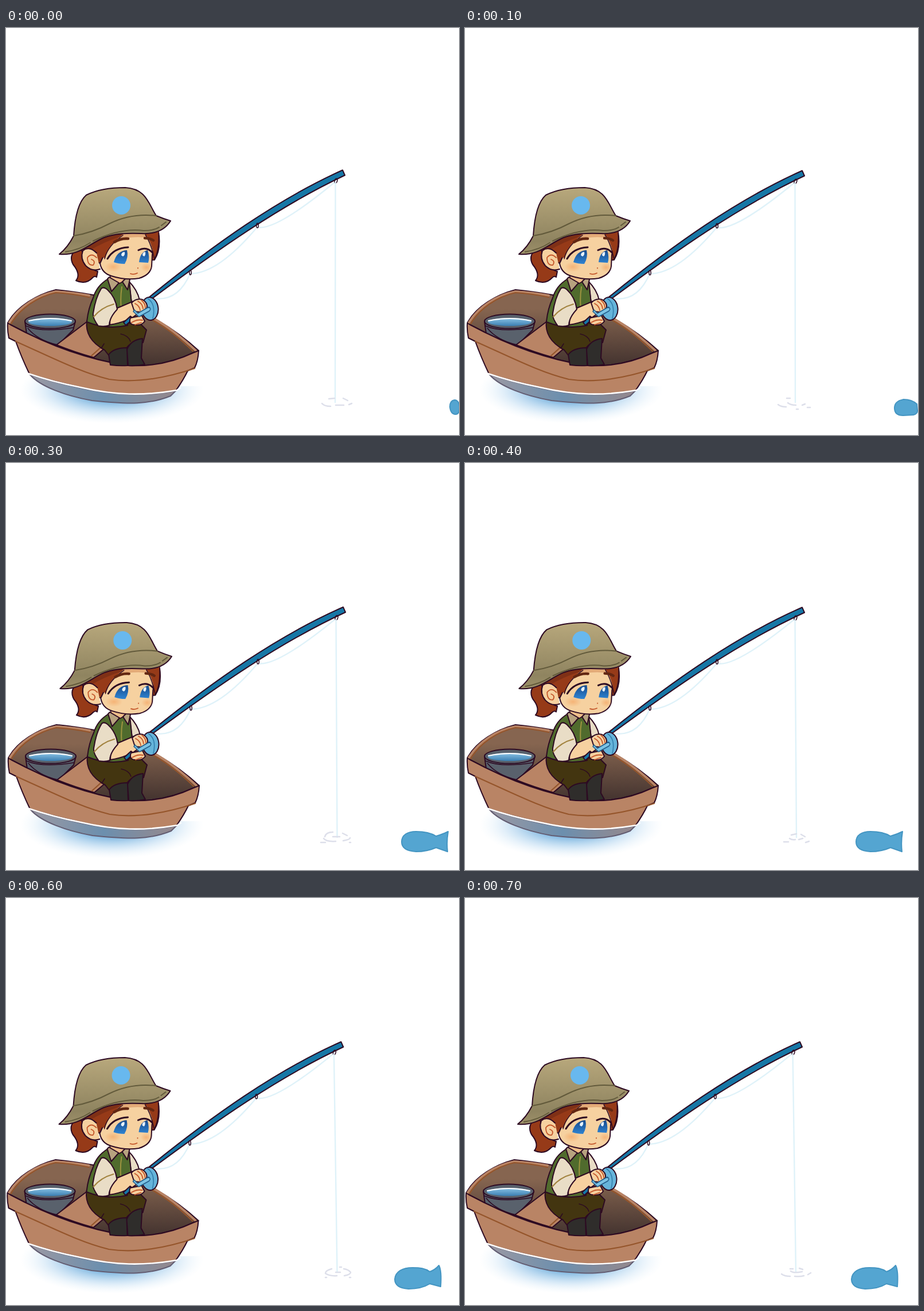
Write an HTML page that moves like this. It is 790 px wide and 709 px high and loops after 800 ms.

```html
<!DOCTYPE html>
<html lang="en">
<head>
<meta charset="utf-8">
<title>Fishing</title>
<style>
html, body { margin: 0; width: 100%; height: 100%; overflow: hidden; background: #fff; }
svg { display: block; width: 100%; height: 100%; }
path, ellipse, line { stroke-linecap: round; stroke-linejoin: round; }
.ink { stroke: #2d0a22; stroke-width: 2; }
.thin { fill: none; stroke: #2d0a22; stroke-width: 1.5; }
.rim { fill: none; stroke: #95552b; stroke-width: 2.2; }
.edge { fill: none; stroke: #b98465; stroke-width: 4; }
.skin { fill: #f6d1a0; }
.hair { fill: #963a18; }
.crease { fill: none; stroke: #c4562a; stroke-width: 1.8; }
.string { fill: none; stroke: #dff2f9; stroke-width: 2.4; }
.stitch { fill: none; stroke: #625a3b; stroke-width: 2; }
</style>
</head>
<body>
<svg viewBox="0 0 790 709">
<defs>
  <radialGradient id="water">
    <stop offset="0" stop-color="#3b8fce" stop-opacity=".95"/><stop offset=".4" stop-color="#5aa2d8" stop-opacity=".7"/>
    <stop offset=".7" stop-color="#8cc0e8" stop-opacity=".33"/><stop offset="1" stop-color="#cfe7f7" stop-opacity="0"/>
  </radialGradient>
  <linearGradient id="inside" x2="0" y2="1">
    <stop offset=".25" stop-color="#866550"/><stop offset="1" stop-color="#43332f"/>
  </linearGradient>
  <linearGradient id="keel">
    <stop offset="0" stop-color="#9b98a2"/><stop offset=".5" stop-color="#6c8fae"/><stop offset="1" stop-color="#96888c"/>
  </linearGradient>
  <linearGradient id="felt" x2="0" y2="1">
    <stop offset="0" stop-color="#b8a87c"/><stop offset=".8" stop-color="#8f8460"/><stop offset="1" stop-color="#9d9069"/>
  </linearGradient>
  <linearGradient id="iris" x2="0" y2="1">
    <stop offset="0" stop-color="#174a8c"/><stop offset="1" stop-color="#2f84d2"/>
  </linearGradient>
  <linearGradient id="pool" x2="0" y2="1">
    <stop offset="0" stop-color="#8cc4e6"/><stop offset="1" stop-color="#3b7fb2"/>
  </linearGradient>
  <radialGradient id="blush">
    <stop offset="0" stop-color="#f4a765" stop-opacity=".7"/><stop offset="1" stop-color="#f4a765" stop-opacity="0"/>
  </radialGradient>
  <clipPath id="surface"><path d="M20 598Q120 630 200 634Q280 622 350 624V709H20Z"/></clipPath>
</defs>

<ellipse cx="185" cy="630" rx="160" ry="59" fill="url(#water)" clip-path="url(#surface)"/>

<g id="boat">
  <path class="ink" fill="url(#inside)" d="M3 514C18 485 55 464 87 456C110 458 135 462 152 465C210 474 285 515 336 562L326 566C290 583 250 590 213 588C130 576 60 545 8 517Z"/>
  <path class="edge" d="M6 513C22 486 55 465 87 459Q118 461 145 466M246 500Q285 519 331 562"/>
  <path class="rim" d="M9 515C25 488 55 468 87 461Q118 463 145 469M246 504Q285 523 326 563"/>
  <path class="ink" fill="#59616c" d="M33 511L36 533Q62 546 90 553L117 526L121 511Z"/>
  <ellipse class="ink" cx="77" cy="511" rx="44" ry="12.5" fill="#59616c"/>
  <ellipse cx="77" cy="512" rx="38" ry="7" fill="url(#pool)"/>
  <path d="M40 510Q77 502 114 510" fill="none" stroke="#fff" stroke-width="2"/>
  <path class="thin" d="M35 519Q62 531 117 522M38 523Q55 544 90 552"/>
  <path class="ink" fill="#b98465" d="M88 552L142 511L172 558L153 574Q120 565 88 552Z"/>
  <path class="rim" d="M149 571L168 554"/>
  <path class="ink" fill="#b98465" d="M3 514L8 517C60 545 130 576 213 588C250 590 290 583 326 566L336 562Q335 580 329 592L317 597Q310 612 296 632C240 642 190 640 130 626Q80 615 41 603C30 580 22 560 17 546L5 540Q2 526 3 514Z"/>
  <path class="rim" d="M17 546C80 574 130 600 180 612C235 620 290 606 329 593"/>
  <path fill="url(#keel)" stroke="#635d72" stroke-width="2" d="M42 604Q80 616 130 627C190 640 240 642 296 632L287 641C250 656 215 656 150 649C105 641 60 625 42 604Z"/>
  <path d="M39 602Q80 616 130 626C190 640 240 641 298 631L304 627" fill="none" stroke="#fff" stroke-width="2.600"/>

  <!-- legs -->
  <path class="ink" fill="#433510" d="M141 510C138 532 150 549 172 561L179 570Q192 557 210 558Q217 545 239 548L245 526L234 515Z"/>
  <path class="ink" fill="#2f2d2b" d="M179 569L182 587Q198 589 212 588L211 557Q188 557 179 569ZM213 588L211 560Q218 543 238 541L236 575L242 586Q228 589 213 588Z"/>
  <path class="thin" d="M217 546Q214 536 200 533M166 558L171 550"/>

  <!-- torso -->
  <path class="ink" fill="#e9ddc6" d="M214 441Q229 456 233 474L220 486Z"/>
  <path class="ink" fill="#506b2d" d="M178 437Q158 449 152 470Q143 490 141 512Q176 526 212 518L219 480L215 441Z"/>
  <path fill="none" stroke="#9f9440" stroke-width="2" d="M202 451Q199 470 201 489M196 507Q205 509 213 504"/>
  <path class="thin" style="fill:#eebd88" d="M181 430L184 442L198 445L210 438V431Z"/>
  <path class="ink" fill="#b7a27f" d="M177 437L184 459L197 444L180 434ZM203 442L212 456L216 438L211 434Z"/>
  <path class="ink skin" d="M182 493L222 476L240 490L221 504Q202 514 181 517Z"/>
  <path class="ink" fill="#e9ddc6" d="M166 454Q156 470 152 497Q151 506 161 519Q172 521 180 518Q180 505 194 490Q191 469 177 456Q170 450 166 454Z"/>
  <path d="M153 503Q166 487 188 481" fill="none" stroke="#a2833f" stroke-width="2"/>
</g>

<g id="rod">
  <path class="string" d="M258 471Q300 477 321 428Q370 428 438 347Q470 354 574 268"/>
  <path class="ink" fill="#1677a6" d="M249.500 469C361 378.500 473 298.500 587 247.500L591 256.500C478 309.500 367 387.500 252.500 473Z"/>
  <g class="thin">
    <ellipse cx="321.500" cy="426" rx="1.700" ry="4"/>
    <ellipse cx="438.500" cy="344" rx="1.800" ry="4"/>
    <ellipse cx="575.500" cy="266" rx="2.200" ry="4" transform="rotate(18 575 266)"/>
  </g>
</g>

<g id="grip">
  <path class="ink" fill="#1677a6" d="M205 513L217 502L222 506L209 518Z"/>
  <path class="ink skin" d="M217 505Q213 517 225 517Q236 519 242 511L237 501Z"/>
  <path class="crease" d="M219 513Q229 507 238 509M225 517L236 513"/>
  <ellipse class="ink" cx="251" cy="489" rx="14.500" ry="20" fill="#66b4da" transform="rotate(-6 251 489)"/>
  <path d="M247 471Q262 481 256 506" fill="none" stroke="#337fae" stroke-width="1.600"/>
  <path class="ink skin" d="M219 479Q227 470 238 473Q247 478 246 487L237 495L224 494Z"/>
  <path class="crease" d="M230 476Q238 480 239 489M236 474Q243 480 243 487M225 480Q233 484 234 492"/>
  <path fill="#7cc4e5" stroke="#245e8b" stroke-width="1.600" d="M224 491L230 497L249 486Q254 489 250 493L232 503L222 494Z"/>
</g>

<g id="head">
  <path class="ink hair" d="M122 386Q109 397 117 412Q131 429 122 440Q139 448 151 435Q155 431 158 434L160 424Q145 420 139 405L160 380Z"/>
  <path class="ink hair" d="M128 378Q137 408 168 410L259 404Q271 385 266 355Q200 330 145 362Z"/>
  <path class="ink skin" d="M164 410Q167 427 184 432Q209 440 232 436Q252 430 254 415L255 395L263 362Q220 350 190 362L171 395Z"/>
  <path fill="#e3aa77" d="M190 362Q220 350 262 358L260 368Q220 358 186 374Z"/>
  <path class="hair" d="M140 380Q151 395 173 401Q178 378 206 358L180 352Z"/>
  <path fill="#712b15" d="M140 379L145 388Q170 373 200 363L206 355L180 352Z" opacity=".6"/>
  <path class="hair" d="M240 357Q253 366 259 403Q270 382 266 354Z"/>
  <path class="thin" d="M172 402Q177 380 204 361M243 360Q253 375 259 403Q268 385 266 357"/>
  <path class="ink skin" d="M158 392Q145 379 134 388Q129 402 139 414Q150 425 164 420"/>
  <path class="crease" d="M158 400Q149 391 142 400Q142 414 152 413Q157 406 149 403"/>
  <ellipse cx="187" cy="416" rx="15" ry="9" fill="url(#blush)"/>
  <ellipse cx="245" cy="417" rx="10" ry="8" fill="url(#blush)"/>
  <path d="M189 373Q200 366 213 367M242 366Q251 366 257 370" fill="none" stroke="#632712" stroke-width="4.500"/>
  <path fill="url(#iris)" d="M188 408Q193 388 211 387Q214 399 207 411Q196 411 188 408ZM232 408Q234 390 247 387Q251 399 248 409Z"/>
  <path d="M177 402Q188 383 213 382M231 387Q245 380 255 391" fill="none" stroke="#2d0a22" stroke-width="3"/>
  <path fill="#e6f2fb" d="M201 396Q201 390 207 390Q208 396 204 398ZM238 396Q238 390 243 390Q244 395 241 398Z"/>
  <path class="crease" d="M217 428Q223 430 229 427M230 418v.5"/>

  <path class="ink" fill="url(#felt)" d="M118 362C120 330 126 303 140 291C160 281 185 278 208 278C244 280 248 305 262 327Q274 332 287 336C276 354 256 359 236 358C210 357 190 358 171 365C143 377 128 397 93 394Q108 382 118 362Z"/>
  <path class="stitch" d="M118 362Q150 357 180 341Q218 322 262 327M104 390Q129 386 147 374M152 371Q200 348 240 353Q258 353 267 347M271 344L279 338"/>
  <circle cx="201" cy="309" r="16" fill="#68b8ee"/>
</g>

<line id="line" class="string"/>
<path id="ripple" fill="none" stroke="#dddfea" stroke-width="2.500"/>
<path id="fish" fill="#54a5d1" stroke="#4495c2" stroke-width="2"/>
</svg>

<script>
const $ = id => document.getElementById(id);
const set = (id, attrs) => Object.entries(attrs).forEach(([k, v]) => $(id).setAttribute(k, v));

// Per 100 ms step: sway, head tilt, rod stretch and dip at the tip, foot of the line
const poses = [
  [0, 0, 0, 0, 574], [1, 0, 0, 1, 576], [1, .6, 0, 3, 577], [1, .6, 0, 3.5, 577.5],
  [1, .6, 0, 4, 578], [0, 0, -2.5, 3, 578], [-.5, 0, -2.2, 3, 577.5], [-1, 0, -2, 3, 577]
];

const swim = "M682 660C682 648 692 642 707 642C724 642 734 645 742 650Q753 647 763 642Q760 660 762 677L742 670C733 674 724 677 707 677C691 676 682 670 682 660Z";
const glide = "M674 664C675 651 687 644 705 644C718 644 727 645 735 651Q744 648 751 640Q756 649 754 677L735 672C727 677 716 681 698 681C682 680 674 674 674 664Z";
const fish = [
  ["M782 648C776 649 774 654 774 660C775 669 779 673 784 673C789 673 791 668 791 660C790 651 787 648 782 648Z"],
  ["M765 647C753 649 749 654 749 662C749 671 754 675 764 675L782 674Q789 672 789 667L788 655Q779 647 765 647Z"],
  ["M698 660C698 648 708 642 722 642C738 642 748 646 757 652L777 643Q775 660 776 677L757 668C748 673 738 676 721 676C706 675 698 670 698 660Z"],
  [swim, 8], [swim], [swim], [glide, 4], [glide]
];

const ring = "M568 646Q557 649 557 654Q565 659 577 658M590 658Q601 656 601 652Q597 647 589 646M575 652h8M557 661h2M599 661h2M582 643h3";
const arcs = "M556 651Q558 643 570 643M554 654Q558 660 575 659M588 658Q600 656 600 653M549 661h8M570 651h12M599 661h2M587 645l8 4";
const ripples = [
  "M551 654Q555 659 566 659M575 657h14M598 656l5-2M563 646l10-1M588 645l8 4",
  "M546 656Q551 660 560 660M561 645h6M563 653Q568 657 577 657M578 664h3M588 657l5-2M597 661h5",
  arcs, arcs,
  "M556 660h8M566 654Q570 657 576 656M569 648l9-2M586 647l7 4M582 656l7-2M594 661l6-2",
  ring, ring,
  "M552 655Q557 659 567 659M575 659Q585 660 591 658M598 656l5-3M568 650Q573 654 588 651M567 646h5M583 645l6 2"
];

function draw(step) {
  const [dx, tilt, stretch, dip, foot] = poses[step];
  const sx = stretch / 340, ky = dip / 340;
  const move = `translate(${dx})`;
  set("boat", { transform: move });
  set("grip", { transform: move });
  set("head", { transform: `${move} rotate(${tilt} 200 430)` });
  set("rod", { transform: `matrix(${1 + sx} ${ky} 0 1 ${dx - sx * 250} ${-ky * 250})` });
  set("line", { x1: 574.5 + dx + sx * 325, y1: 269 + ky * 325, x2: foot, y2: 652 });
  set("ripple", { d: ripples[step] });
  const [d, shift = 0] = fish[step];
  set("fish", { d, transform: `translate(${shift})` });
}

function frame() {
  draw(Math.floor(performance.now() % 800 / 100));
  requestAnimationFrame(frame);
}
frame();
</script>
</body>
</html>
```
